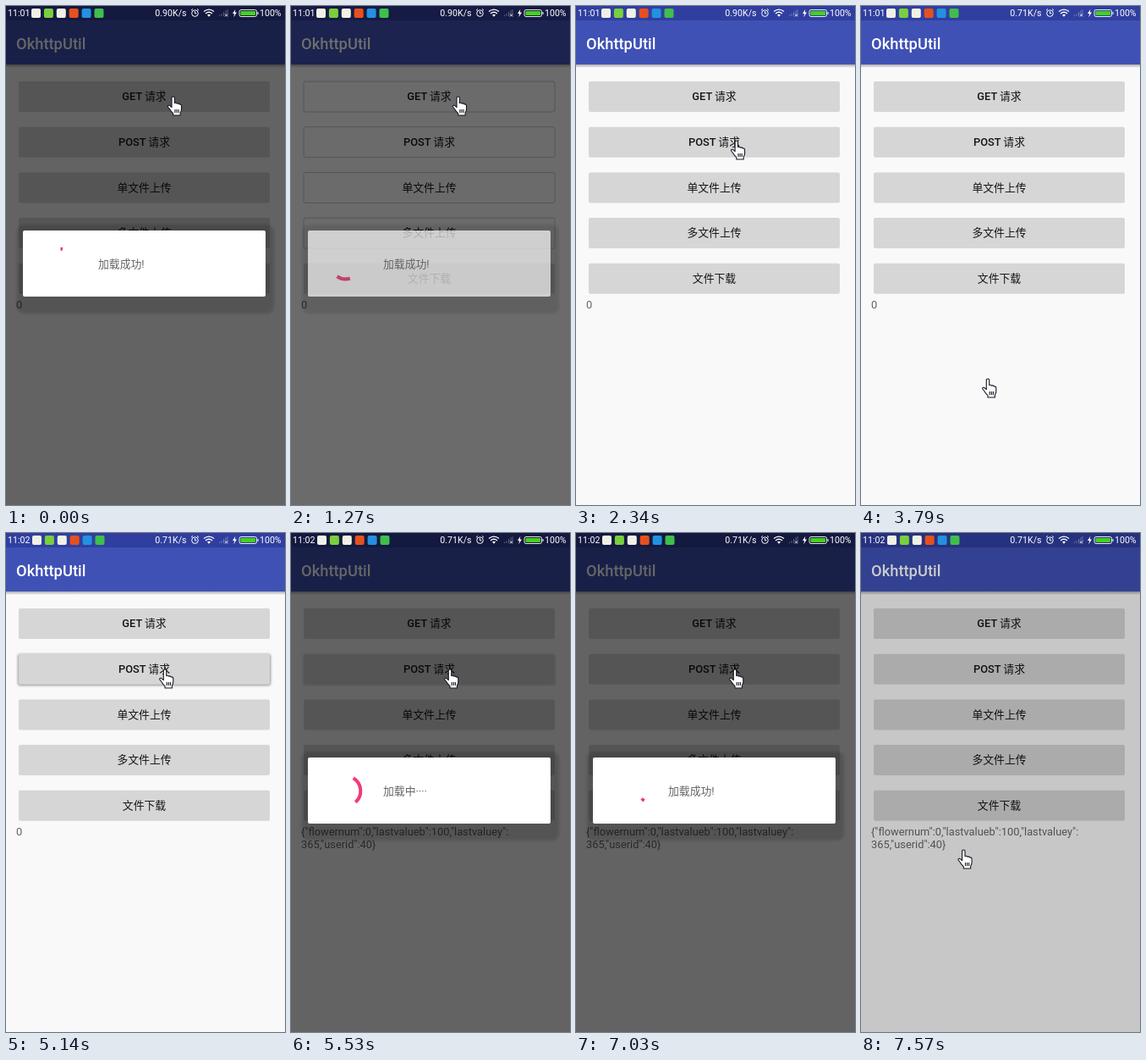
An HTML page that plays this animation: 330 px wide and 589 px high, repeating every 8000 ms.

```html
<!DOCTYPE html>
<html lang="zh">
<head>
<meta charset="utf-8">
<style>
html, body { margin: 0; width: 330px; height: 589px; overflow: hidden; background: #f9f9f9; }
svg { display: block; }
text { font-family: Roboto, "Noto Sans CJK SC", "Noto Sans CJK", sans-serif; font-size: 12.83px; white-space: pre; }
#buttons text { font-weight: 500; text-anchor: middle; fill: #141414; }
#status text { font-size: 10.6px; fill: #fff; }
#label text { fill: #656565; }
</style>
</head>
<body>
<svg id="stage" width="330" height="589" viewBox="0 0 330 589">
  <defs>
    <linearGradient id="fade" x2="0" y2="1">
      <stop stop-opacity=".32"/><stop offset="1" stop-opacity="0"/>
    </linearGradient>
    <filter id="soft" x="-10%" y="-30%" width="120%" height="160%"><feGaussianBlur stdDeviation="1.6"/></filter>
  </defs>
  <rect width="330" height="589" fill="#f9f9f9"/>
  <rect width="330" height="69" fill="#3f51b5"/>
  <rect width="330" height="17" fill="#303f9f"/>
  <rect y="69" width="330" height="4" fill="url(#fade)"/>
  <text x="12" y="50.5" fill="#fff" style="font-size:18.33px;font-weight:500">OkhttpUtil</text>
  <rect id="lift" x="14" y="143" width="299" height="37" rx="3" filter="url(#soft)" opacity="0"/>
  <g id="buttons"></g>
  <g id="label"><text x="12" y="357"></text><text x="12" y="372"></text></g>
  <rect id="dim" width="330" height="589"/>
  <g id="dialog">
    <rect x="13" y="258" width="304" height="105" rx="8" opacity=".14" filter="url(#soft)"/>
    <rect x="20" y="265" width="287" height="78" rx="2" fill="#fff"/>
    <path id="ring" fill="none" stroke="#f5377b" stroke-width="4"/>
    <text id="message" x="109" y="309" fill="#646464"></text>
  </g>
  <g id="status">
    <text id="clock" x="2" y="12.3"></text>
    <g id="icons"></g>
    <text id="speed" x="213.5" y="12.3" text-anchor="end"></text>
    <g fill="none" stroke="#fff">
      <circle cx="223.5" cy="8.6" r="3.8"/>
      <path d="M223.5 6.2V8.8H225.5M219 5.2L221 3.4M228 5.2L226 3.4"/>
      <path d="M234 6.6Q240 1.8 246 6.6M236 8.9Q240 5.6 244 8.9" stroke-width="1.3"/>
      <path d="M238 10.6Q240 9 242 10.6L240 12.8Z" fill="#fff" stroke="none"/>
      <path d="M252.5 12V10.5M255 12V9M257.5 12V7M260 12V5M262 12V4" stroke-opacity=".3"/>
      <path d="M259 9.5L262 12.5M262 9.5L259 12.5" stroke-width=".8"/>
      <path d="M271.3 3.8L268 9H270.2L269.2 13.2L273 7.6H270.7Z" fill="#fff" stroke="none"/>
      <rect x="276" y="4.5" width="20.5" height="8" rx="2" stroke-width=".9"/>
      <rect x="277.4" y="5.9" width="17.7" height="5.2" rx="1" fill="#45d01c" stroke="none"/>
      <path d="M298 7V10"/>
    </g>
    <text x="300" y="12.3">100%</text>
  </g>
  <path id="hand" fill="#fff" stroke="#161622" stroke-width="1.1" stroke-linejoin="round"
    d="M-1.7 1.6Q-1.7 0 0 0Q1.7 0 1.7 1.6V7.6Q3.4 6.6 4.6 8.3Q6.2 7.3 7.3 9Q9.6 8.5 9.8 11V15Q9.8 17 8.4 19V22H0V19.6Q-2.6 17.5-4.2 14.5L-6.2 12Q-6.6 10-4.6 10.2L-1.7 12.6ZM2.2 15V19M4.3 15V19M6.4 15V19"/>
</svg>
<script>
const LOOP = 8000;
const $ = id => document.getElementById(id);

// Moments at which the screen refreshes
const ticks = [0, 150, 290, 430, 570, 700, 840, 980, 1120, 1270, 1420, 1540, 2070, 2200, 2340,
  3120, 3250, 3380, 3510, 3790, 3930, 4070, 4210, 4350, 4490, 5140, 5410, 5530, 5650, 5780,
  5910, 6040, 6180, 6310, 6460, 6610, 6750, 6880, 7010, 7150, 7280, 7420, 7570];

// time, dim, dialog opacity
const fades = [[0, .6, 1], [1270, .57, .68], [1420, .25, 0], [1540, 0, 0],
  [5410, .35, .6], [5530, .6, 1], [7150, .57, .68], [7280, .35, .1], [7420, .2, 0]];

// time, fingertip x, y
const moves = [[0, 197.7, 107], [2070, 196, 118], [2200, 192, 142], [2340, 189.8, 159],
  [3120, 155, 215], [3250, 105, 330], [3380, 87, 418], [3510, 155, 462],
  [3790, 150, 440], [3930, 146, 380], [4070, 150, 310], [4210, 162, 240], [4350, 178, 185],
  [4490, 188, 161], [7150, 172, 215], [7280, 140, 310], [7420, 122, 377], [7570, 121.3, 374]];

const lifts = [[0, 0], [5140, .4], [5410, .3], [5530, .12], [6460, 0]];
const messages = [[0, "加载成功!"], [5410, "加载中····"], [6460, "加载成功!"]];
const labels = [[0, "0", ""], [5530, '{"flowernum":0,"lastvalueb":100,"lastvaluey":', '365,"userid":40}']];
const clocks = [[0, "11:01", 0], [3930, "11:02", 1]];
const speeds = [[0, "0.90K/s"], [3250, "0.71K/s"]];

const at = (rows, t) => rows.findLast(row => row[0] <= t);

$("buttons").innerHTML = ["GET 请求", "POST 请求", "单文件上传", "多文件上传", "文件下载"].map((name, i) => {
  const y = 89 + i * 53.7;
  return `<rect x="15" y="${y}" width="297" height="36" rx="2"/><text x="163.5" y="${y + 22.3}">${name}</text>`;
}).join("");
const plates = [...document.querySelectorAll("#buttons rect")];

$("icons").innerHTML = ["#f0f0e6", "#79cf3d", "#f0f0e6", "#e6501f", "#2490e0", "#3fbf4b"].map((color, i) =>
  `<rect x="${30 + i * 14.9}" y="3" width="11" height="11" rx="2" fill="${color}"/>`).join("");

// cubic-bezier(.4, 0, .2, 1)
function ease(x) {
  if (x <= 0) return 0;
  if (x >= 1) return 1;
  let lo = 0, hi = 1, u = .5;
  for (let i = 0; i < 20; i++) {
    const v = 1 - u;
    if (1.2 * u * v * v + .6 * u * u * v + u * u * u < x) lo = u; else hi = u;
    u = (lo + hi) / 2;
  }
  return 3 * u * u - 2 * u * u * u;
}

function point(deg) {
  const a = deg * Math.PI / 180;
  return `${64.5 + 17.8 * Math.sin(a)} ${304.5 - 17.8 * Math.cos(a)}`;
}

function arc(t) {
  const second = t >= 5410, dt = t - 5530;
  const phase = (second ? .146 + dt * .4925 / 930 : t * .784 / 1270) % 1;
  const turn = second ? 31 + dt * .1108 : t * .219;
  const start = turn + 288 * ease(2 * phase - 1);
  const end = turn + 288 * ease(2 * phase) + 8;
  return `M${point(start)}A17.8 17.8 0 ${end - start > 180 ? 1 : 0} 1 ${point(end)}`;
}

function draw(time) {
  const t = ticks.findLast(tick => tick <= time);
  const [, dim, shown] = at(fades, t);
  const [, x, y] = at(moves, t);
  const [, clock, shift] = at(clocks, t);
  const hollow = t === 1270;

  $("dim").setAttribute("opacity", dim);
  $("dialog").setAttribute("opacity", shown);
  $("lift").setAttribute("opacity", at(lifts, t)[1]);
  $("hand").setAttribute("transform", `translate(${x} ${y})`);
  $("icons").setAttribute("transform", `translate(${shift} 0)`);
  $("clock").textContent = clock;
  $("speed").textContent = at(speeds, t)[1];
  $("message").textContent = at(messages, t)[1];
  const [, first, second] = at(labels, t);
  $("label").children[0].textContent = first;
  $("label").children[1].textContent = second;
  plates.forEach((plate, i) => {
    const outline = hollow && i < 4;
    plate.setAttribute("fill", outline ? "#f9f9f9" : "#d6d6d6");
    plate.setAttribute("stroke", outline ? "#c4c4c4" : "none");
  });
  if (shown) $("ring").setAttribute("d", arc(t));
}

const begin = performance.now();
function loop() {
  draw((performance.now() - begin) % LOOP);
  requestAnimationFrame(loop);
}
loop();
</script>
</body>
</html>
```
